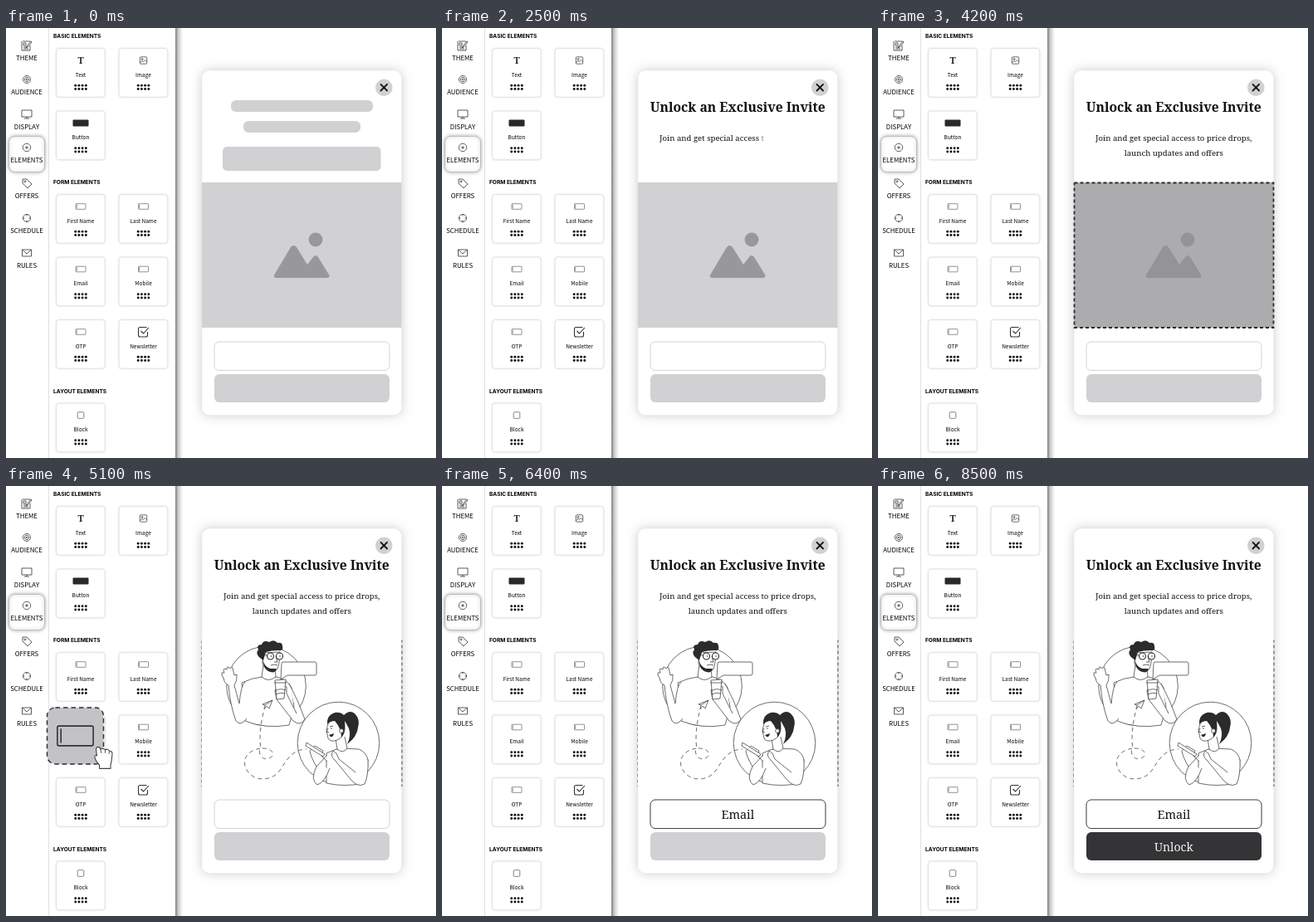
Recreate the animation shown at these times as an HTML page with a canvas. Size 518 by 518 pixels, loop 9 s.

```html
<!DOCTYPE html>
<html lang="en">
<head>
<meta charset="utf-8">
<title>Popup builder</title>
<style>
  html, body { margin: 0; width: 100%; height: 100%; overflow: hidden; background: #fff; }
  canvas { display: block; width: 518px; height: 518px; }
</style>
</head>
<body>
<canvas id="stage"></canvas>
<script>
const SIZE = 518, LOOP = 9000, STEP = 100;
const SANS = '"Noto Sans CJK SC", "Noto Sans CJK JP", "Open Sans", sans-serif';
const SERIF = '"Noto Serif", serif';
const INK = '#2b2b2d', LINE = '#3c3c3e', GREY = '#d1d1d3';
const canvas = document.getElementById('stage');
const ctx = canvas.getContext('2d');
const ratio = window.devicePixelRatio || 1;
canvas.width = canvas.height = SIZE * ratio;

const ramp = (t, from, to) => Math.min(1, Math.max(0, (t - from) / (to - from)));
const mix = (a, b, p) => a + (b - a) * p;
const inOut = p => p < 0.5 ? 2 * p * p : 1 - 2 * (1 - p) * (1 - p);

function box(x, y, w, h, r, fill, stroke, width = 1) {
  ctx.beginPath();
  ctx.roundRect(x, y, w, h, r);
  if (fill) { ctx.fillStyle = fill; ctx.fill(); }
  if (stroke) { ctx.strokeStyle = stroke; ctx.lineWidth = width; ctx.stroke(); }
}

function shape(d, fill, stroke, width = 0.75) {
  const path = new Path2D(d);
  if (fill) { ctx.fillStyle = fill; ctx.fill(path); }
  if (stroke) { ctx.strokeStyle = stroke; ctx.lineWidth = width; ctx.stroke(path); }
}

function disc(x, y, r, fill, stroke, width = 0.75) {
  ctx.beginPath();
  ctx.arc(x, y, r, 0, 7);
  if (fill) { ctx.fillStyle = fill; ctx.fill(); }
  if (stroke) { ctx.strokeStyle = stroke; ctx.lineWidth = width; ctx.stroke(); }
}

function label(str, x, y, font, align = 'center', color = '#000') {
  ctx.font = font;
  ctx.textAlign = align;
  ctx.fillStyle = color;
  ctx.fillText(str, x, y);
}

function withAlpha(alpha, draw) {
  if (alpha <= 0) return;
  ctx.save();
  ctx.globalAlpha *= alpha;
  draw();
  ctx.restore();
}

function withShadow(color, blur, draw) {
  ctx.save();
  ctx.shadowColor = color;
  ctx.shadowBlur = blur * ratio;
  draw();
  ctx.restore();
}

// Centred line whose characters appear one by one; the newest is still fading in.
function typed(str, count, y, font, color = '#111') {
  if (count <= 0) return;
  ctx.font = font;
  const x = 356.3 - ctx.measureText(str).width / 2;
  const whole = Math.min(str.length, Math.floor(count));
  const done = str.slice(0, whole);
  label(done, x, y, font, 'left', color);
  if (whole < str.length) {
    const next = x + ctx.measureText(done).width;
    withAlpha(count - whole, () => label(str[whole], next, y, font, 'left', color));
  }
}

const icons = {
  text(s) { label('T', 0, 4 * s, `bold ${11 * s}px ${SERIF}`, 'center', INK); },
  image(s) {
    const k = 4.2 * s, w = 0.8 * Math.sqrt(s);
    box(-k, -k, 2 * k, 2 * k, s, null, '#444', w);
    disc(-k * 0.35, -k * 0.35, k * 0.25, null, '#444', w);
    shape(`M${-k} ${k * 0.65}L${-k * 0.3} ${k * 0.15}L0 ${k * 0.4}L${k * 0.45} ${-k * 0.1}L${k} ${k * 0.4}`,
      null, '#444', w);
  },
  button(s) { box(-9.5 * s, -4 * s, 19 * s, 8 * s, s, '#29292b'); },
  field(s) {
    const line = s > 1 ? '#333' : '#777', w = s > 1 ? 1.6 : 0.8;
    box(-6 * s, -3.3 * s, 12 * s, 6.6 * s, 0.5 * s, null, line, w);
    shape(`M${-4.8 * s} ${-2.4 * s}V${2.4 * s}`, null, line, w);
  },
  news() {
    shape('M4-5.500H-4Q-6-5.500-6-3.500V4Q-6 6-4 6H3Q5 6 5 4V0M-3-1L0 2L6.500-5', null, '#333', 1.1);
  },
  block() { box(-3.8, -3.8, 7.6, 7.6, 1, null, '#666', 0.8); }
};

const tiles = [
  ['Text', 60, 24, 'text'], ['Image', 135.5, 24, 'image'], ['Button', 60, 99.5, 'button'],
  ['First Name', 60, 200, 'field'], ['Last Name', 135.5, 200, 'field'],
  ['Email', 60, 275.5, 'field'], ['Mobile', 135.5, 275.5, 'field'],
  ['OTP', 60, 351, 'field'], ['Newsletter', 135.5, 351, 'news'], ['Block', 60, 451.5, 'block']
];

function drawTile([name, x, y, icon]) {
  withShadow('rgba(0,0,0,.1)', 2, () => box(x + 0.5, y + 0.5, 58.8, 58.8, 3.5, '#fff', '#e2e2e4', 0.8));
  ctx.save();
  ctx.translate(x + 30, y + 15);
  icons[icon](1);
  ctx.restore();
  label(name, x + 30, y + 34.5, `6.5px ${SANS}`);
  for (let i = 0; i < 8; i++) disc(x + 23.7 + (i % 4) * 4.2, y + 45.3 + (i >> 2) * 4.2, 1.45, '#111');
}

const menu = [
  ['THEME', 36, 'M-5-5H4M4 0V6H-6V-5M-4-3H-1V0H-4ZM-4 2H1M-4 4H2M5-5L0 1L-1 3L1 2L6-4Z'],
  ['AUDIENCE', 77, 'M4.500 0A4.500 4.500 0 1 1 4.500-.1ZM2.600 0A2.600 2.600 0 1 1 2.600-.1ZM.8 0A.8.8 0 1 1 .8-.1Z'],
  ['DISPLAY', 119, 'M-6-5H6V3H-6ZM0 3V5M-3 5H3'],
  ['ELEMENTS', 159, 'M4.700 0A4.700 4.700 0 1 1 4.700-.1ZM-2 0H2M0-2V2'],
  ['OFFERS', 202, 'M-5-5H0L6 1L1 6L-5 0ZM-2-3A1 1 0 1 1-2.1-3'],
  ['SCHEDULE', 244, 'M4.5 0A4.5 4.5 0 1 1 4.5-.1ZM0-5V-2.500M0 2.500V5M-5 0H-2.500M2.500 0H5'],
  ['RULES', 286, 'M-5.5-4H5.5V4H-5.5ZM-5.5-4L0 1L5.5-4']
];

function drawSidebar() {
  const edge = ctx.createLinearGradient(204, 0, 213, 0);
  edge.addColorStop(0, 'rgba(0,0,0,.5)');
  edge.addColorStop(0.4, 'rgba(0,0,0,.2)');
  edge.addColorStop(1, 'rgba(0,0,0,0)');
  ctx.fillStyle = edge;
  ctx.fillRect(204, 0, 9, SIZE);
  ctx.fillStyle = '#fff';
  ctx.fillRect(0, 0, 204, SIZE);
  ctx.fillStyle = '#e0e0e2';
  ctx.fillRect(51, 0, 1, SIZE);
  withShadow('rgba(0,0,0,.3)', 4, () => box(3.5, 130.5, 43, 43, 7, '#fff', '#bdbdbf', 1));
  for (const [name, y, d] of menu) {
    ctx.save();
    ctx.translate(25, y - 15);
    shape(d, null, '#333', 0.8);
    ctx.restore();
    label(name, 25, y + 2.8, `500 7.8px ${SANS}`);
  }
  const heads = [['BASIC ELEMENTS', 11.7], ['FORM ELEMENTS', 187.7], ['LAYOUT ELEMENTS', 439.7]];
  for (const [name, y] of heads) label(name, 57, y, 'bold 6.6px Inter, sans-serif', 'left');
  tiles.forEach(drawTile);
}

// Drop area: darker fill with a dashed frame.
function dropArea(x, y, w, h, r, level, width) {
  withAlpha(level, () => {
    box(x, y, w, h, r, '#acacae');
    ctx.setLineDash([4, 3]);
    box(x, y, w, h, r, null, INK, width);
  });
}

function drawMan() {
  disc(313.5, 241, 47.8, '#fff', LINE);
  shape('M284 237Q297 231 308 230L326 230Q339 233 344 243L347 266L341 288Q313 293 288 283Z', '#fff', LINE);
  shape('M288 236Q283 240 281 262L275 240Q279 234 278 227L275 228L273 219Q271 217 270 220L268 218Q266 217 266 221L263 220Q261 221 263 225L260 225Q259 228 262 231Q263 238 268 240Q270 264 277 283Q283 290 290 280', '#fff', LINE);
  shape('M341 238Q352 258 360 281Q355 290 346 283L326 257L324 247Q326 240 331 238L338 242L338 250L350 274', '#fff', LINE);
  shape('M324 234L337 233L335 256L326 257ZM323 237H338', '#fff', LINE);
  shape('M324 247Q330 243 337 246M325 251Q330 248 336 250', null, LINE);
  shape('M310 216L308 230Q316 237 325 230L324 220', '#fff', LINE);
  shape('M309 201L309 214Q313 224 322 224Q328 223 329 212L330 200Z', '#fff', LINE);
  shape('M309 208L311 214Q315 220 320 220L326 220Q325 225 319 224Q310 222 309 208Z', INK);
  shape('M306 207Q300 202 304 197Q301 191 308 191Q310 185 317 188Q323 184 327 189Q333 188 333 193Q335 199 328 198Q320 198 313 200L310 210Z', INK);
  disc(318.5, 205, 4, '#fff', INK, 1.1);
  disc(329.5, 205, 4, '#fff', INK, 1.1);
  shape('M309 203L315 204M325 205L327 212L323 212M319 216Q323 214 327 216', null, INK);
  disc(319.5, 205, 0.7, INK);
  disc(330, 205, 0.7, INK);
  shape('M334 212H372Q374 212 374 214V226Q374 228 372 228H339L331 233L332 214Q332 212 334 212Z', '#fff', LINE);
}

function drawWoman() {
  disc(400.5, 309.5, 49.3, '#fff', LINE);
  shape('M386 322Q395 317 404 316L425 317Q435 321 436 331L431 358Q408 363 386 358Z', '#fff', LINE);
  shape('M397 304L399 317Q406 323 411 316L408 302', '#fff', LINE);
  shape('M389 283L386 294L388 304Q391 309 399 306Q407 303 408 292L403 281Z', '#fff', LINE);
  shape('M387 287Q386 276 396 273Q403 272 407 276Q414 269 420 274Q427 281 424 291Q423 302 411 311Q416 301 413 292Q410 286 408 283Q410 296 404 303Q404 292 396 283Q391 283 387 287Z', INK);
  disc(404, 295, 2.4, '#fff', LINE);
  shape('M390 290L394 289M388 292L386 296L389 297', null, INK);
  shape('M389 300L395 298Q394 303 391 302Z', INK);
  disc(392, 292, 0.7, INK);
  shape('M387 324L374 338Q367 326 366 319L372 313L382 319L380 325L387 332M374 338Q366 354 375 360Q384 357 390 340', '#fff', LINE);
  shape('M362 309L384 323L382 326L361 313Z', '#fff', LINE);
  shape('M436 329Q437 348 432 359Q423 364 414 352L396 330Q390 325 394 319L398 322L401 329L421 345', '#fff', LINE);
}

function drawScene() {
  ctx.fillStyle = '#fff';
  ctx.fillRect(236, 185, 240.5, 177);
  ctx.lineJoin = 'round';
  drawMan();
  drawWoman();
  shape('M309 263L321 258L317 268L314 265L311 269L312 264ZM312 264L321 258', '#fff', LINE);
  ctx.setLineDash([5, 4]);
  shape('M310 273C306 290 305 306 307 316C319 315 327 323 317 328C306 332 303 317 307 316C291 318 283 330 290 342C298 356 318 356 328 345C338 332 342 318 362 317', null, LINE);
}

function drawPicture(t) {
  ctx.fillStyle = GREY;
  ctx.fillRect(236, 186, 240.5, 175);
  const level = ramp(t, 3600, 3900);
  dropArea(236.5, 186.5, 240, 174.5, 0, level, 1.8);
  const tone = level ? '#949496' : '#98989a';
  shape('M325 301Q321 300 324 296L343 264Q346.500 260 350 264L363 285L370 276Q373 272 376 276L389 297Q391 300 387 301Z', tone);
  disc(373, 255, 8.4, tone);
  withAlpha(ramp(t, 4200, 4500), drawScene);
}

function drawPopup(t) {
  withShadow('rgba(0,0,0,.2)', 13, () => box(236, 51, 240.5, 415.5, 9, '#fff'));
  box(236, 51, 240.5, 415.5, 9, '#fff', '#e8e8ea', 0.6);
  disc(455.3, 71.7, 10.3, GREY);
  shape('M451 67.400L459.600 76M459.600 67.400L451 76', null, '#111', 1.8);

  withAlpha(1 - ramp(t, 1200, 1500), () => {
    const level = ramp(t, 700, 900);
    for (const [x, y, w, h, r] of [[271, 87, 171, 14, 6], [286, 112, 141, 14, 6], [261, 143, 190.5, 29, 5]]) {
      box(x, y, w, h, r, GREY);
      dropArea(x, y, w, h, r, level, 1);
    }
  });
  typed('Unlock an Exclusive Invite', (t - 1400) * 0.045, 101.3, `bold 15.7px ${SERIF}`);
  const count = (t - 2200) * 0.095;
  const first = 'Join and get special access to price drops,';
  typed(first, count, 136, `9.65px ${SERIF}`);
  typed('launch updates and offers', count - first.length, 154.3, `9.65px ${SERIF}`);

  drawPicture(t);

  const dropped = ramp(t, 5700, 5900);
  box(251, 378, 211, 34.5, 6, '#fff', '#d4d4d6', 1);
  dropArea(251, 378, 211, 34.5, 6, ramp(t, 5300, 5600) * (1 - dropped), 1.4);
  withAlpha(dropped, () => box(251, 378, 211, 34.5, 6, '#fff', '#444', 1));
  typed('Email', (t - 5900) * 0.0125, 401, `14.4px ${SERIF}`);

  const filled = ramp(t, 7500, 7800);
  box(251, 417, 211, 34, 6, GREY);
  dropArea(251, 417.5, 211, 33.5, 6, ramp(t, 7100, 7400) * (1 - filled), 1.4);
  withAlpha(filled, () => box(251, 417, 211, 34, 6, '#343436'));
  typed('Unlock', (t - 7800) * 0.0086, 439.5, `14px ${SERIF}`, '#f4f4f4');
}

function drawHand(x, y, speed) {
  ctx.save();
  ctx.translate(x, y);
  if (speed > 0.1) ctx.filter = `blur(${2.2 * speed * ratio}px)`;
  ctx.lineJoin = 'round';
  ctx.scale(1 + speed * 0.35, 1);
  shape('M-5 13.5V9Q-10 4-10.5 0Q-11-3-8-2L-9-9Q-9-12.5-6.5-12.5Q-4-12.5-3.5-9.5Q-1-12 2-9Q5-11 7-7.5Q10.5-8 10.5-4L9.5 5L8.5 9V13.5Z',
    '#fff', '#444', 1.1);
  shape('M-3.5-9.5L-3-5M2-9L2-5M7-7.5L6.500-4', null, '#444', 0.9);
  ctx.restore();
}

const drags = [
  { icon: 'text', zoom: 3.8, from: [90, 54], to: [356, 82], start: 200, move: 600, end: 1100 },
  { icon: 'image', zoom: 3.4, from: [165.5, 54], to: [356, 274], start: 3200, move: 3500, end: 4000 },
  { icon: 'field', zoom: 3.6, from: [83.5, 301], to: [356, 375], start: 4700, move: 5150, end: 5650 },
  { icon: 'button', zoom: 2.3, from: [88, 129], to: [356, 415], start: 6600, move: 7000, end: 7500 }
];

function drawDrag({ icon, zoom, from, to, start, move, end }, t) {
  if (t <= start || t >= end + 100) return;
  const grow = ramp(t, start, start + 300);
  const raw = ramp(t, move, end), p = inOut(raw);
  const speed = 1 - Math.abs(2 * raw - 1);
  const x = mix(from[0], to[0], p), y = mix(from[1], to[1], p);
  const size = mix(60, 68, grow) - 7 * Math.min(1, raw * 2.5);
  withAlpha(Math.min(1, grow * 1.5) * (1 - ramp(t, end, end + 100)), () => {
    ctx.save();
    ctx.translate(x, y);
    ctx.rotate(-0.04 * speed);
    box(-size / 2, -size / 2, size, size, 10, '#c3c3c5');
    ctx.setLineDash([5.5, 4]);
    box(-size / 2, -size / 2, size, size, 10, null, INK, 1.4);
    ctx.setLineDash([]);
    icons[icon](zoom * size / 68);
    ctx.restore();
    drawHand(x + size * 0.5 - 2 * raw, y + size * 0.38 - 3 * speed, speed);
  });
}

function draw(now) {
  const t = Math.floor((now % LOOP) / STEP) * STEP;
  ctx.setTransform(ratio, 0, 0, ratio, 0, 0);
  ctx.fillStyle = '#fff';
  ctx.fillRect(0, 0, SIZE, SIZE);
  drawSidebar();
  drawPopup(t);
  for (const drag of drags) drawDrag(drag, t);
}

const begin = performance.now();
(function frame() {
  draw(performance.now() - begin);
  requestAnimationFrame(frame);
})();
</script>
</body>
</html>
```
